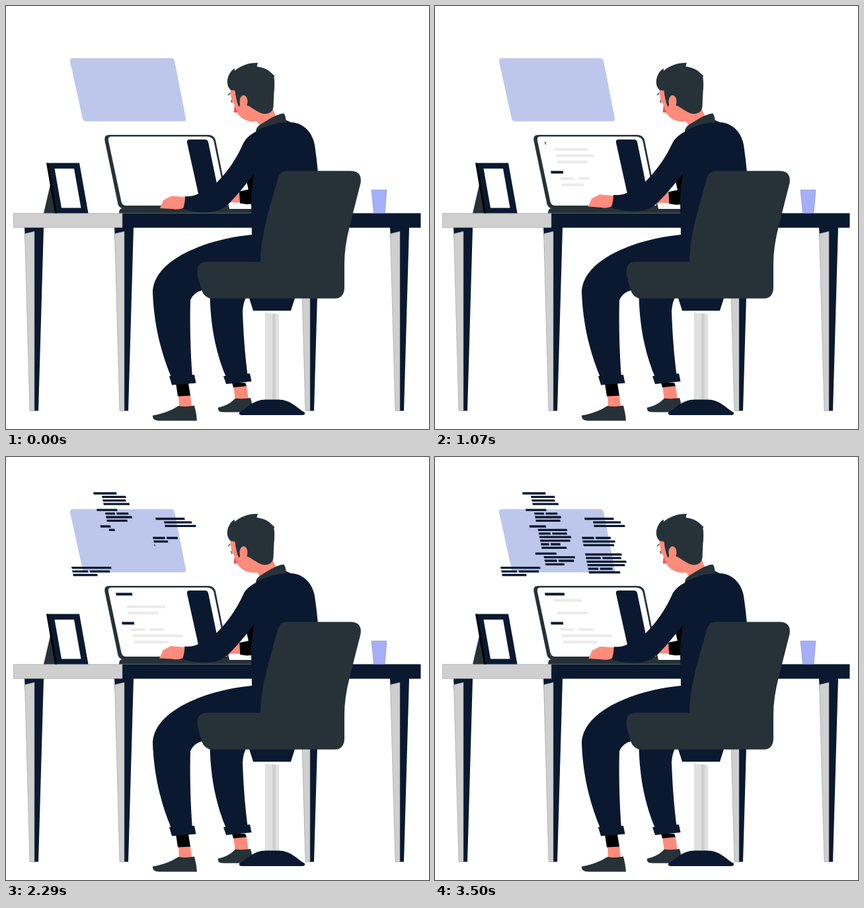
An HTML page that plays this animation: 640x640 px, repeating every 3.57 s.

```html
<!DOCTYPE html>
<html lang="en">
<head>
<meta charset="utf-8">
<title>Working at a desk</title>
<style>
  html, body { margin: 0; width: 100%; height: 100%; overflow: hidden; background: #fff; }
  svg { display: block; width: 100vw; height: 100vh; }
  .navy { fill: #0a192f; }
  .dark { fill: #263238; }
  .skin { fill: #ff8b7b; }
  .grey { fill: #cfcfcf; }
  .white { fill: #fff; }
  .pale { fill: #ebebeb; }
  .edge { stroke: #858b94; stroke-width: .5; }
  .line { fill: none; stroke: #263238; stroke-linecap: round; }
</style>
</head>
<body>
<svg viewBox="0 0 640 640">
  <defs>
    <g id="leg">
      <path class="navy" d="M28 335H57L49 612.5H42Z"/>
      <path class="grey edge" d="M28.5 344.5L43 341V612.5H36Z"/>
    </g>
  </defs>

  <path fill="#bcc7eb" d="M101 79H250Q254 79 255 83L272 170Q273 174.500 268 174.500H121Q117 174.500 116 170.500L97 84Q96 79 101 79Z"/>
  <g id="code"></g>

  <!-- desk -->
  <use href="#leg"/>
  <use href="#leg" x="136"/>
  <use href="#leg" x="417"/>
  <use href="#leg" x="553"/>
  <path class="navy" d="M176 313.500H627.500V335.500H176Z"/>
  <path class="grey edge" d="M11.500 313.800H176V335.300H11.500Z"/>
  <path fill="#a4aff8" stroke="#7f88c4" stroke-width=".6" d="M553 278.300H576L573 313.300H556.500Z"/>

  <!-- photo frame -->
  <path class="dark" d="M68 266L57 313.500H76Z"/>
  <path class="navy" d="M62 237.500H111L124.500 313.500H76Z"/>
  <path d="M61 237.500H64L77 313.500H74Z"/>
  <path class="white" d="M73.500 246H103L113.500 305.500H84Z"/>

  <!-- laptop -->
  <path class="dark" d="M156 195H306Q314.500 195 317 203L338 307H372V313.500H171Q171 306 176 306Q171 305 169.500 300L149.500 204Q148 195 156 195Z"/>
  <path class="white" d="M159 197.500H304Q312.500 197.500 314.500 205L334.500 302H182Q176 302 174.500 296L155 204Q154 197.500 159 197.500Z"/>
  <path class="navy" d="M278 202H301Q305 202 306 206L324 293Q324 297 321 297H298Q294 297 293 293L274 207Q273 202 278 202Z"/>
  <g id="screen"></g>

  <!-- far arm -->
  <path d="M379 238L362 257L369 287H376Z"/>
  <g id="farHand">
    <path class="skin" d="M328 306L330 299L337 291L344 287L358 288L359 305L344 304.500L340 307Z"/>
    <path d="M357 288L369 285.500L376 284V307L368 307.500L358 306Z"/>
  </g>

  <!-- legs -->
  <path class="skin" d="M261 588H279L281 607H262Z"/>
  <path d="M257 571H276L279 589.500L260 590.500Z"/>
  <path class="skin" d="M344 575H364L367 596H347Z"/>
  <path d="M342 570H362L364 575L344 577Z"/>
  <path class="dark" d="M222 619.500C236 617 248 613 261 605Q272 607 285 604.500Q288 615 289 627.500H232Q221 627 222 619.500Z"/>
  <path class="dark" d="M321 607.500C333 605 341 600 347 593.500Q358 595 370 593Q374 604 371 614.500H329Q319 614 321 607.500Z"/>
  <path class="navy" d="M308.500 440C310 488 318 527 334 564L366 562C361 525 359 490 358 462Q359 447 364 440Z"/>
  <path class="navy" d="M329 560L369 556L371.500 568L333 572Z"/>
  <path class="navy" d="M372 346C300 353 222 385 222 434C224 482 234 524 251 564L282 562C279 525 278 480 279 445Q284 433 297 430L400 420V346Z"/>
  <path class="navy" d="M247 560L285 558L287.500 570.500L251 573.500Z"/>

  <!-- chair stand -->
  <path fill="#e0e0e0" d="M392 464L413 466V600H392Z"/>
  <path class="grey" d="M403 465L408 465.500V600H403Z"/>
  <path class="navy" d="M353 615C364 609 374 595.500 393 595.500H412C431 595.500 441 609 452 615Q453 619 448 619H357Q352 619 353 615Z"/>
  <path class="navy" d="M368 442H437L431 461H374Z"/>

  <!-- body -->
  <path class="navy" d="M379 188C388 178 404 172 422 172L431 176C452 177 464 193 467 210Q470 230 472 252L440 400H384L373 388L372 346L371 300C370 282 374 262 378 240L372 205Z"/>
  <path class="skin" d="M378 172L403 154L410 171L386 183Z"/>
  <path class="dark" d="M378 189Q379 182 387 178C397 172 408 164 420 162.500Q423 164 424 176.500C408 176 393 182 378 189Z"/>

  <g id="head">
    <path class="skin" d="M339 124L341 140L346 151L345 161L350 161.500C354 169 363 175 375 175Q382 175 387 170L400 160L385 120Z"/>
    <path fill="#f2505d" d="M346 151L344.500 161L350 161Z"/>
    <path class="line" stroke-width="1.300" d="M336.500 134.500L339 132M341 142.500L342 146"/>
    <path class="dark" d="M340 127C333 121 334 110 338 103Q341 97 346 94.500L346 98C355 90 368 85.500 381 86L379.500 91.500C389 93 396 96 400 100L406.500 106L405.500 107Q407 118 405.500 131L404.500 153C403 162 395 164.500 387 162.500C377 159 371 152 364 150L352 152Q348 142 346.500 128Z"/>
    <ellipse class="skin" cx="359.500" cy="144.500" rx="6" ry="9.500"/>
    <path class="skin" d="M355 148L352 154L364 164L367 152Z"/>
  </g>

  <!-- near arm -->
  <path id="hand" class="skin"/>
  <path id="finger" fill="none" stroke="#ffa99c" stroke-width=".6"/>
  <path id="arm" class="navy"/>

  <path class="dark" d="M425 249.500H522Q539 250 536.500 268L520 333Q512 364 512 390V427Q511 442.500 497 442.500H312Q300 442 296 430L290 408Q287 388 302 387H385C385 364 390 338 397 312L411 262Q414 249.500 425 249.500Z"/>
</svg>

<script>
const LOOP = 3570, STEP = LOOP / 50, CYCLE = LOOP / 3;
const GROW = 250, SLANT = 0.2;
const byId = id => document.getElementById(id);
const clamp = v => Math.max(0, Math.min(1, v));

// Paired poses: hand on the keys, hand raised.
const poses = {
  arm: [
    "M382 188C370 194 362 200 358 210C348 232 336 250 318 268L291 284C284 288 277 288 271 288C271 294 270 300 268 307C280 311 292 312 302 312C318 312 330 307 339 297C350 286 363 270 376 253L400 215Z",
    "M382 188C370 194 365 199 359 208C346 222 330 238 314 252L288 268C279 269 269 269 260 268C260 275 257 281 254 287C263 293 276 297 290 297.5C306 298 318 297 326 292C342 282 361 262 378 243L400 215Z"
  ],
  hand: [
    "M233 306L238 294L250 287.5L272 289L269 305C263 308 258 308 252 307Z",
    "M219 280L228 268L240 264L261 268L255 285C249 287 244 286 238 284Z"
  ],
  finger: ["M251 289L251 304", "M240 266L237 281"]
};

function morph([from, to], p) {
  const target = to.match(/[\d.]+/g);
  let i = 0;
  return from.replace(/[\d.]+/g, n => (+n + (target[i++] - n) * p).toFixed(2));
}

// A slanted bar wiped in from the left; a split bar has a gap between two words.
const bars = [];
function addBar(parent, { x, y, width, start, h, cls = "navy", gap = 0, period = LOOP }) {
  const el = document.createElementNS("http://www.w3.org/2000/svg", "path");
  el.setAttribute("class", cls);
  byId(parent).append(el);
  const s = h * SLANT, cut = x + width * 0.42, end = x + width;
  const words = gap ? [[x, cut], [cut + gap, end]] : [[x, end]];
  bars.push(t => {
    const front = t < start ? x : x + width * clamp((t - start) % period / GROW);
    el.setAttribute("d", words.filter(([a]) => front > a).map(([a, b]) =>
      `M${a} ${y - h / 2}H${Math.min(b, front)}l${s} ${h}H${a + s}Z`).join(""));
  });
}

// The page on the laptop: a title and three lines per section.
function addSection({ x, y, title, widths, start, pace, gap, period, titlePeriod = period }) {
  const h = 3.8;
  addBar("screen", { x, y, width: title, start, h, period: titlePeriod });
  widths.forEach((width, i) => addBar("screen", {
    x: x + 14 + 2.2 * i, y: y + 9.5 * (i + 1), width, h, period,
    start: start + pace * (i + 1), cls: "pale", gap: i ? 0 : gap
  }));
}
const RETYPE = 1016;
addSection({ x: 166, y: 207.5, title: 29.5, widths: [51, 58, 46], start: 44, pace: 203, period: RETYPE });
addSection({ x: 175, y: 251.5, title: 18.5, widths: [50, 76, 52], start: 740, pace: 110, gap: 7, titlePeriod: RETYPE });

// The floating code: every paragraph takes its line lengths from one rhythm.
const RHYTHM = [1, 0.97, 1.09, 1.03, 0.67, 0.86];
function addParagraph({ x, y, start, rows, width, from = 0, heading = 0, split = -1 }) {
  const lead = heading ? 1 : 0;
  const row = (i, bar) => addBar("code", { y: y + 5.4 * i, start: start + 105 * i, h: 3.3, ...bar });
  if (heading) row(0, { x, width: heading });
  for (let i = 0; i < rows; i++) {
    row(i + lead, {
      x: x + 13 * lead + 1.1 * i,
      width: width * RHYTHM[from + i],
      gap: i % 3 === split ? 2.5 : 0
    });
  }
}
[
  { x: 132, y: 55, start: 1475, rows: 3, width: 36, heading: 35 },
  { x: 137, y: 80.2, start: 1760, rows: 3, width: 36, from: 1, heading: 31, split: 0 },
  { x: 142.5, y: 105, start: 2130, rows: 6, width: 44, heading: 25, split: 1 },
  { x: 151.5, y: 146.2, start: 2850, rows: 3, width: 43, from: 2, heading: 32, split: 1 },
  { x: 99, y: 167.7, start: 1703, rows: 3, width: 55, from: 2, split: 1 },
  { x: 226, y: 93.5, start: 1800, rows: 2, width: 43, from: 1, heading: 44 },
  { x: 222, y: 122.5, start: 2070, rows: 3, width: 45, from: 1, split: 0 },
  { x: 227, y: 147.5, start: 2545, rows: 6, width: 55, split: 1 }
].forEach(addParagraph);

function draw(t) {
  const lift = (1 - Math.cos(2 * Math.PI * t / CYCLE)) / 2;
  for (const id in poses) byId(id).setAttribute("d", morph(poses[id], lift));
  byId("farHand").setAttribute("transform", `translate(${-4 * (1 - lift)} ${-7.5 * (1 - lift)})`);
  byId("head").setAttribute("transform", `rotate(${-1.4 * lift} 395 170)`);
  bars.forEach(update => update(t));
}

function tick() {
  const step = Math.floor((performance.now() + 5) / STEP) % 50;
  draw(step * STEP);
  requestAnimationFrame(tick);
}
tick();
</script>
</body>
</html>
```
